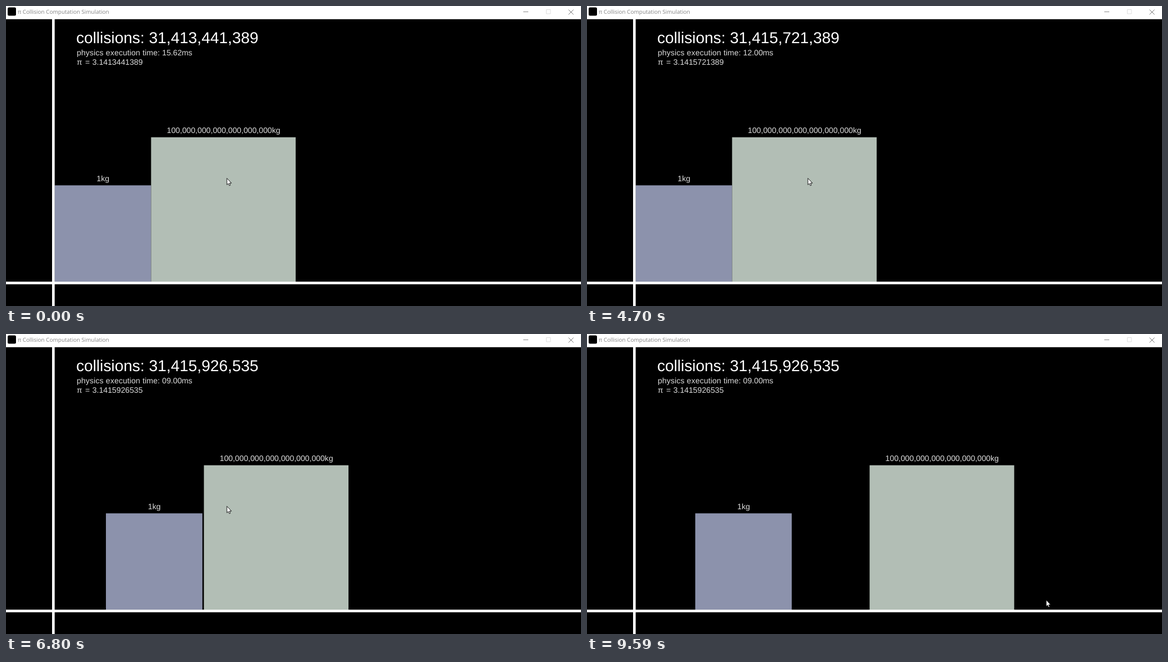
An HTML page that plays this animation: 1036 px wide and 541 px high, repeating every 9640 ms.

```html
<!DOCTYPE html>
<html lang="en">
<head>
<meta charset="utf-8">
<title>π Collision Computation Simulation</title>
<style>
  html, body { margin: 0; width: 100%; height: 100%; overflow: hidden; background: #000; }
  svg { display: block; width: 1036px; height: 541px; }
  text { font-family: "Liberation Sans", Arial, sans-serif; font-size: 14.2px; fill: #dcdcdc;
         text-rendering: geometricPrecision; white-space: pre; }
  .big { font-size: 28.4px; fill: #fff; }
  .title { font-family: "Open Sans", "Noto Sans", sans-serif; font-size: 10px; fill: #858585; }
  .mid { text-anchor: middle; }
  .lead { letter-spacing: .14px; }
  .btn { fill: none; stroke-width: 1; }
</style>
</head>
<body>
<svg viewBox="0 0 1036 541">
  <rect width="1036" height="541"/>

  <g id="small">
    <rect y="323.4" width="173.8" height="174" fill="#8c92ac"/>
    <text class="mid" x="87.2" y="316.4">1kg</text>
  </g>
  <g id="large">
    <rect y="236.7" width="260.5" height="261" fill="#b2beb5"/>
    <text class="mid" x="130.6" y="229.4">100,000,000,000,000,000,000kg</text>
  </g>

  <rect x="83" y="23" width="4.7" height="518" fill="#fff"/>
  <rect y="497.1" width="1036" height="4.7" fill="#fff"/>

  <text class="big" id="hits" x="126.5" y="67.2"></text>
  <text class="lead" x="127.5" y="88.8">physics execution time:</text>
  <text id="cost" x="281.3" y="88.8"></text>
  <text x="127.6" y="106">π</text>
  <text x="142.8" y="106">=</text>
  <text id="pi" x="155.6" y="106"></text>

  <rect width="1036" height="23.8" fill="#fff"/>
  <rect x="3" y="2.5" width="15" height="15" rx="2.5"/>
  <text class="title" x="21" y="14">π Collision Computation Simulation</text>
  <path class="btn" stroke="#888" d="M932 10.5h9"/>
  <path class="btn" stroke="#ddd" d="M973.5 6.5h7.5v7.5h-7.5z"/>
  <path class="btn" stroke="#777" d="M1013.5 6.5l9 9M1022.5 6.5l-9 9"/>

  <path id="cursor" fill="#fff" stroke="#000" stroke-width=".9"
        d="M0 0V11.8L2.6 9.4 4.3 13.3 6.2 12.5 4.6 8.7H8.2z"/>
</svg>
<script>
const LOOP = 9640;
// time in ms, step number: the picture updates about every 48 ms
const TICKS = [[0, 0], [50, 1], [1060, 22], [1440, 30], [2030, 42], [3040, 63], [3330, 69],
  [4040, 84], [5040, 105], [5550, 116], [6040, 126], [6800, 142], [7040, 147], [8010, 167],
  [8570, 179], [9010, 188], [9590, 200], [LOOP, 201]];

const WALL = 87.6, WIDTH = 173.8;          // wall edge, small block width
const RELEASE = 5060, LAST_HIT = 6744;     // large block leaves; final collision
const V = 0.0547, V_END = 0.0054;          // px per ms: large block, small block at the end
const FIRST = 31413441389, FINAL = 31415926535;
const BATCH = 10000, BATCH_MS = 20.4;
const COSTS = [10, 11, 11, 12, 11, 10, 12];

const $ = id => document.getElementById(id);
const gap = t => Math.max(0, V * (t - RELEASE));

// Small block's straight runs, latest first: [start time, start x, speed]
function buildRuns() {
  let t = LAST_HIT, u = 2 * V - V_END;
  const runs = [[t, gap(t), V_END]];
  while (t - RELEASE > 3) {
    const bounce = t - gap(t) / u;
    runs.push([bounce, 0, u]);
    t = (u * bounce + V * RELEASE) / (u + V);
    runs.push([t, gap(t), -u]);
    u += 2 * V;
  }
  return runs;
}
const runs = buildRuns();

function snap(t) {
  const i = TICKS.findIndex(p => p[0] > t);
  const [t0, k0] = TICKS[i - 1], [t1, k1] = TICKS[i];
  const ms = (t1 - t0) / (k1 - k0);
  const n = Math.floor((t - t0) / ms + 1e-6);
  return [t0 + n * ms, k0 + n];
}

function state(t) {
  if (t < RELEASE) return [0, FIRST + BATCH * Math.round(t / BATCH_MS)];
  let i = runs.findIndex(r => r[0] <= t);
  if (i < 0) i = runs.length - 1;
  const [start, x, v] = runs[i];
  return [Math.max(0, x + v * (t - start)), FINAL - i];
}

function cost(t, k) {
  if (k === 0) return "15.62ms";
  const n = t < RELEASE ? COSTS[k % 7] : k % 23 === 10 ? 10 : 9;
  return String(n).padStart(2, "0") + ".00ms";
}

const place = (id, x, y) => $(id).setAttribute("transform", `translate(${x.toFixed(2)} ${y.toFixed(2)})`);

function draw(now) {
  const [t, k] = snap(now);
  const [x, hits] = state(t);
  place("small", WALL + x, 0);
  place("large", WALL + WIDTH + gap(t), 0);
  $("hits").textContent = "collisions: " + hits.toLocaleString("en-US");
  $("pi").textContent = String(hits).replace("3", "3.");
  $("cost").textContent = cost(t, k);

  const p = Math.min(1, Math.max(0, (t - 9050) / 500));
  const e = p * p * (3 - 2 * p);
  place("cursor", 398 + 429.3 * e, 310.6 + 169 * e);
}

const begin = performance.now();
function frame() {
  draw((performance.now() - begin) % LOOP);
  requestAnimationFrame(frame);
}
frame();
</script>
</body>
</html>
```
